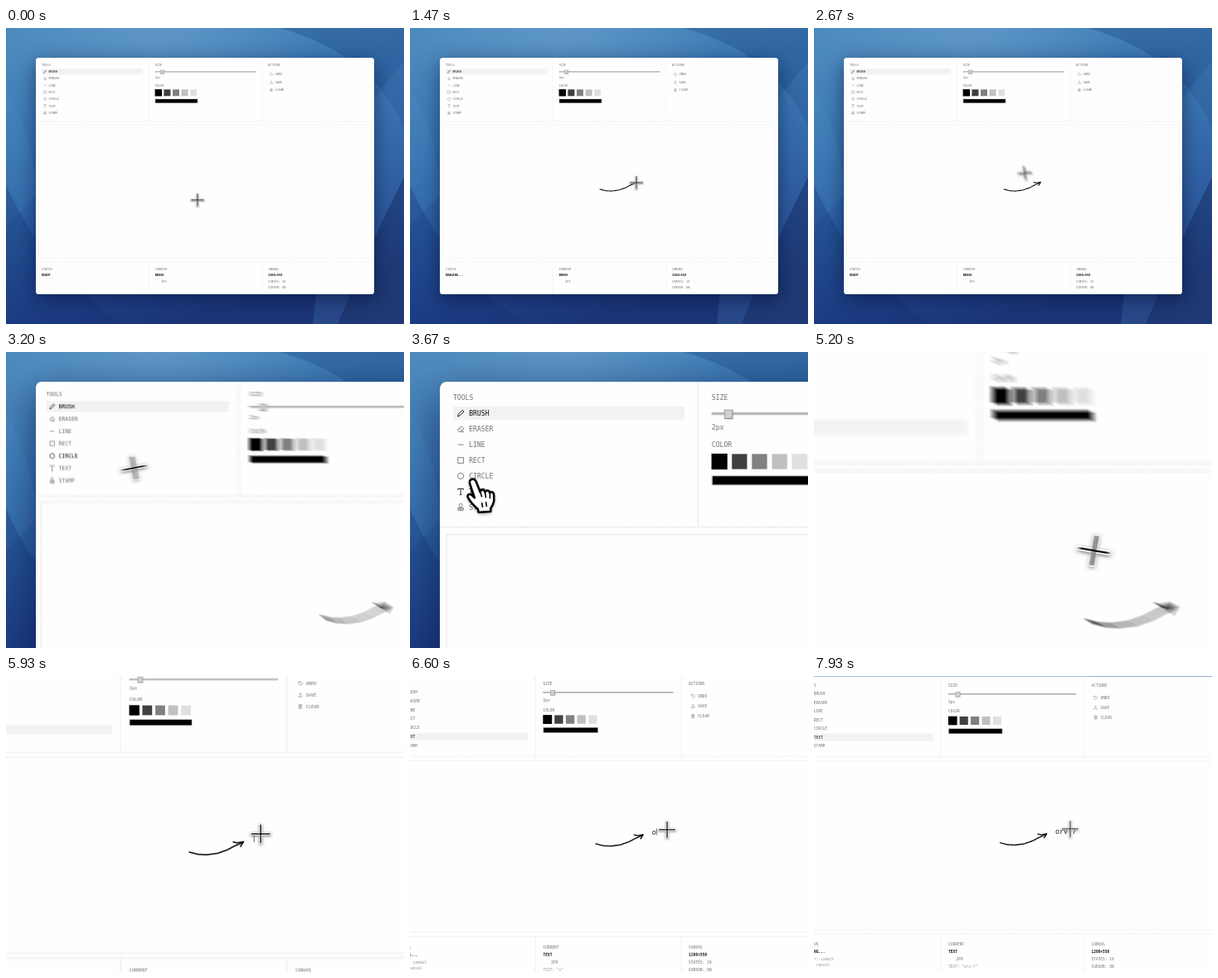
These frames come from a looping animation (480 by 358 pixels, 8 s). An HTML page with a canvas:

```html
<!DOCTYPE html>
<html lang="en">
<head>
<meta charset="utf-8">
<title>Drawing app demo</title>
<style>
html, body { margin: 0; width: 100%; height: 100%; overflow: hidden; background: #24539a; }
canvas { display: block; width: 480px; height: 358px; }
</style>
</head>
<body>
<canvas id="stage"></canvas>
<script>
const W = 480, H = 358, LOOP = 8000, SHUTTER = 20, SAMPLES = 11;
const WIN = { x: 36, y: 36, w: 408, h: 286 };
const FONT = '"DejaVu Sans Mono", "Liberation Mono", monospace';
const GRAY = '#747474', INK = '#111';
const WORD = 'orv-7';
const KEYS_AT = [6400, 6700, 6970, 7230, 7530];
const dpr = window.devicePixelRatio || 1;

function layer(el = document.createElement('canvas')) {
  el.width = Math.round(W * dpr);
  el.height = Math.round(H * dpr);
  return el.getContext('2d');
}
const stage = layer(document.getElementById('stage'));
const buffer = layer();
const wall = layer();

const clamp = (v, a = 0, b = 1) => Math.min(b, Math.max(a, v));
const mix = (a, b, p) => a + (b - a) * p;
const smooth = u => u * u * (3 - 2 * u);

// Critically damped spring, 0 to 1
function spring(t, start, speed) {
  const x = Math.max(0, t - start) / 1000 * speed;
  return 1 - (1 + x) * Math.exp(-x);
}

// Scale and offset: whole window, its corner, the arrow, a wider view
const VIEWS = [
  { s: 1, x: 0, y: 0 },
  { s: 2.345, x: -48.4, y: -48.4 },
  { s: 2.345, x: -334, y: -198 },
  { s: 1.265, x: -65.2, y: -45 }
];
const MOVES = [[2870, 6], [4895, 6], [5165, 4]];

function camera(t) {
  const view = { ...VIEWS[0] };
  MOVES.forEach(([start, speed], i) => {
    const p = spring(t, start, speed);
    for (const k in view) view[k] = mix(view[k], VIEWS[i + 1][k], p);
  });
  return view;
}

// Hand drawn arrow
const SHAFT = [[229, 195], [236, 196.8], [243, 197.2], [252, 196], [260, 193.2], [266, 190], [273, 187]];
const HEAD = [[265, 186.6], [268, 187.4], [273.4, 186.4], [271, 190.3]];

function along(pts, p) {
  const f = clamp(p) * (pts.length - 1), i = Math.min(pts.length - 2, Math.floor(f));
  return [mix(pts[i][0], pts[i + 1][0], f - i), mix(pts[i][1], pts[i + 1][1], f - i)];
}
const shaftPart = t => smooth(clamp((t - 600) / 850));
const headPart = t => clamp((t - 1980) / 480);

// time, x, y, bend of the way there
const PATH = [
  [0, 231, 208], [480, 229, 195], [1470, 273, 187], [1680, 273, 187], [1940, 265, 186.6],
  [2460, 271, 190.3], [2500, 271, 190.3], [3510, 53.5, 89, 2], [4600, 53.5, 89],
  [5480, 287.5, 180], [6100, 287.5, 180], [6500, 295.8, 181.8], [8100, 295.8, 181.8]
];

function pointer(t) {
  if (t >= 480 && t < 1470) return along(SHAFT, shaftPart(t));
  if (t >= 1940 && t < 2460) return along(HEAD, headPart(t));
  const i = PATH.findIndex(k => k[0] > t), a = PATH[Math.max(0, i - 1)], b = PATH[i];
  const p = smooth(clamp((t - a[0]) / (b[0] - a[0] || 1)));
  return [mix(a[1], b[1], p), mix(a[2], b[2], 1 - (1 - p) ** (b[3] || 1))];
}

function paintWall(c) {
  c.scale(dpr, dpr);
  let g = c.createLinearGradient(120, 0, 200, H);
  [[0, '#4c89bd'], [.3, '#3a77b3'], [.6, '#295c9f'], [.85, '#20448c'], [1, '#1b3478']]
    .forEach(([p, col]) => g.addColorStop(p, col));
  c.fillStyle = g;
  c.fillRect(0, 0, W, H);
  g = c.createRadialGradient(190, -10, 0, 190, -10, 190);
  g.addColorStop(0, 'rgba(125,175,215,.42)');
  g.addColorStop(1, 'rgba(125,175,215,0)');
  c.fillStyle = g;
  c.fillRect(0, 0, W, H);
  const sweep = (d, col) => { c.fillStyle = col; c.fill(new Path2D(d)); };
  sweep('M330 0Q440 30 480 120V0Z', 'rgba(20,60,120,.28)');
  sweep('M480 42Q390 130 370 358H480Z', 'rgba(90,150,205,.2)');
  sweep('M480 180Q440 260 400 358H480Z', 'rgba(18,38,92,.45)');
  sweep('M0 75Q30 120 38 200L0 240Z', 'rgba(90,150,205,.16)');
  sweep('M0 190Q50 300 140 358H0Z', 'rgba(20,48,112,.3)');
}

function text(c, str, x, y, color = GRAY, bold = false, size = 3.55) {
  const k = 20;
  c.save();
  c.translate(x, y + size * .365);
  c.scale(1 / k, 1 / k);
  c.font = `${bold ? 'bold ' : ''}${size * k}px ${FONT}`;
  c.fillStyle = color;
  c.fillText(str, 0, 0);
  c.restore();
}

const ICONS = {
  BRUSH: 'M-1.6 1.7L-1.2 .4L.9 -1.7L1.7 -.9L-.4 1.2Z',
  ERASER: 'M-1.7 .4L.3 -1.5L1.7 -.1L.1 1.5H-.7ZM-.8 -.5L.7 1M.1 1.5H1.7',
  LINE: 'M-1.5 0H1.5',
  RECT: 'M-1.5 -1.5H1.5V1.5H-1.5Z',
  CIRCLE: 'M1.6 0A1.6 1.6 0 1 1 -1.6 0A1.6 1.6 0 1 1 1.6 0Z',
  TEXT: 'M-1.5 -1V-1.6H1.5V-1M0 -1.6V1.6M-.6 1.6H.6',
  STAMP: 'M-1.5 1.6H1.5M-1.5 .9V.3H1.5V.9ZM-.4 .3V-.5A.8 .8 0 1 1 .4 -.5V.3',
  UNDO: 'M-1.5 -1.4V-.4H-.5M-1.4 -.4A1.5 1.5 0 1 1 -1 1.1',
  SAVE: 'M-1.5 .6V1.5H1.5V.6M0 -1.6V.7M-.8 -.8L0 -1.6L.8 -.8',
  CLEAR: 'M-1.5 -1.1H1.5M-.5 -1.1V-1.7H.5V-1.1M-1.1 -1.1V1.6H1.1V-1.1M-.3 -.3V.9M.3 -.3V.9'
};
for (const k in ICONS) ICONS[k] = new Path2D(ICONS[k]);

function item(c, name, iconX, textX, y, color) {
  c.save();
  c.translate(iconX, y);
  c.strokeStyle = color;
  c.lineWidth = .38;
  c.stroke(ICONS[name]);
  c.restore();
  text(c, name, textX, y, color);
}

function lines(c) {
  c.save();
  c.strokeStyle = '#d6d6d6';
  c.lineWidth = .36;
  c.setLineDash([1, .7]);
  c.beginPath();
  for (const x of [172.5, 309]) {
    c.moveTo(x, 36); c.lineTo(x, 113);
    c.moveTo(x, 282); c.lineTo(x, 322);
  }
  for (const y of [113, 282]) { c.moveTo(36, y); c.lineTo(444, y); }
  c.rect(39.5, 117, 401, 161);
  c.stroke();
  c.restore();
}

function toolbar(c, t) {
  const picked = t < 4550 ? 'BRUSH' : 'TEXT';
  const hover = t > 3140 && t < 3300 ? 'CIRCLE' : t >= 3300 && t < 4750 ? 'TEXT' : '';
  text(c, 'TOOLS', 43, 44.4);
  ['BRUSH', 'ERASER', 'LINE', 'RECT', 'CIRCLE', 'TEXT', 'STAMP'].forEach((name, i) => {
    const y = 52.7 + i * 8.32, on = name === picked;
    if (on) {
      c.fillStyle = '#f2f2f3';
      c.fillRect(43.2, y - 3.5, 122, 7);
    }
    item(c, name, 47, 51.4, y, on || name === hover ? INK : GRAY);
  });

  text(c, 'SIZE', 179.7, 44.4);
  c.fillStyle = '#a4a4a4';
  c.fillRect(179.7, 52.3, 121.8, 1.3);
  c.fillStyle = '#dedede';
  c.fillRect(180, 52.9, 121.2, .4);
  c.fillStyle = '#8c8c8c';
  c.fillRect(186.4, 50.8, 4.6, 5);
  c.fillStyle = '#d0d0d0';
  c.fillRect(186.7, 51.1, 3.8, 4.2);
  text(c, '2px', 179.7, 60);
  text(c, 'COLOR', 179.7, 69.3);
  ['#000', '#404040', '#808080', '#c0c0c0', '#e0e0e0'].forEach((col, i) => {
    c.fillStyle = col;
    const grow = i ? 0 : .2;
    c.fillRect(179.8 + i * 10.6 - grow, 74.3 - grow, 8 + 2 * grow, 8 + 2 * grow);
  });
  c.fillStyle = '#c8c8c8';
  c.fillRect(179.6, 85.6, 51.8, 5.4);
  c.fillStyle = '#000';
  c.fillRect(180.2, 86.1, 50.6, 4.4);

  text(c, 'ACTIONS', 316, 44.4);
  ['UNDO', 'SAVE', 'CLEAR'].forEach((name, i) => item(c, name, 320, 324.6, 56.2 + i * 9.5, GRAY));
}

function statusBar(c, t, typed) {
  const typing = t > 5800;
  const drawing = (t > 600 && t < 1560) || (t > 1980 && t < 2480);
  text(c, 'STATUS', 43, 292);
  text(c, typing ? 'TYPING...' : drawing ? 'DRAWING...' : 'READY', 43, 299, INK, true);
  text(c, 'CURRENT', 179.7, 292);
  text(c, t < 4550 ? 'BRUSH' : 'TEXT', 179.7, 299, INK, true);
  text(c, '2PX', 187.2, 306.3);
  if (typing) {
    text(c, 'Enter: commit', 43, 306.4, '#999');
    text(c, 'Esc: cancel', 43, 311.7, '#999');
    text(c, `TEXT: "${typed}"`, 179.7, 313.5, '#999');
  }
  text(c, 'CANVAS', 316, 292);
  text(c, '1200×550', 316, 299, INK, true);
  text(c, 'STATES: ' + (t < 600 ? 18 : 19), 316, 306.3);
  text(c, 'CURSOR: ON', 316, 313.3);
}

function inkLine(c, pts, part) {
  if (part <= 0) return;
  c.beginPath();
  c.moveTo(...pts[0]);
  for (let i = 1; i <= 36; i++) c.lineTo(...along(pts, part * i / 36));
  c.stroke();
}

function drawing(c, t, typed) {
  c.strokeStyle = INK;
  c.lineWidth = 1.1;
  c.lineCap = c.lineJoin = 'round';
  inkLine(c, SHAFT, shaftPart(t));
  inkLine(c, HEAD, headPart(t));
  c.lineCap = 'butt';
  if (t < 5700) return;
  text(c, typed, 281.6, 184, '#222', false, 6.6);
  if (Math.floor((t - 5700) / 420) % 2 === 0) {
    c.fillStyle = '#555';
    c.fillRect(281.8 + typed.length * 3.97, 180.8, .6, 6);
  }
}

const CROSS = new Path2D('M-7.2 0H7.2M0 -7.2V7.2');
const HAND = new Path2D('M-4 2C-5 -4 2 -5 4 0L9 13C9 9 14 9 15 13C16 10 20 10 21 14C22 12 26 12 26 17V24Q25 29 22 33V37L7 38L6 34Q-2 27 -6 20C-8 16 -4 14 -1 17L2 20Z');
const CREASES = new Path2D('M9 12L11 19M15 13L16 20M21 14V21M11 26L12 32M16 25L17 31');

function drawPointer(c, t, st, s) {
  const [x, y] = pointer(st);
  const speed = (pointer(Math.min(st + 8, LOOP))[0] - pointer(Math.max(st - 8, 0))[0]) / .016;
  c.save();
  c.translate(x, y);
  c.globalAlpha = 1 - .3 * clamp((t - 7690) / 240);
  c.shadowColor = 'rgba(0,0,0,.55)';
  c.shadowBlur = 2 * s * dpr;
  c.shadowOffsetY = .6 * s * dpr;
  if (t > 3300 && t < 4750) {
    c.scale(1 / 2.345, 1 / 2.345);
    c.lineJoin = 'round';
    c.lineWidth = 2.6;
    c.strokeStyle = '#000';
    c.fillStyle = '#fff';
    c.fill(HAND);
    c.shadowColor = 'transparent';
    c.stroke(HAND);
    c.lineWidth = 1.6;
    c.stroke(CREASES);
  } else {
    if (t > 2480 && t < 5500) c.rotate(clamp(speed * .0007, -.22, .17));
    c.lineCap = 'square';
    c.strokeStyle = '#fff';
    c.lineWidth = 2.5;
    c.stroke(CROSS);
    c.shadowColor = 'transparent';
    c.strokeStyle = '#111';
    c.lineWidth = 1;
    c.stroke(CROSS);
  }
  c.restore();
}

function scene(c, t, st) {
  const { s, x, y } = camera(st);
  const typed = WORD.slice(0, KEYS_AT.filter(k => t >= k).length);
  c.setTransform(1, 0, 0, 1, 0, 0);
  c.drawImage(wall.canvas, 0, 0);
  c.setTransform(s * dpr, 0, 0, s * dpr, x * dpr, y * dpr);
  c.save();
  c.shadowColor = 'rgba(5,15,50,.55)';
  c.shadowBlur = 22 * s * dpr;
  c.shadowOffsetY = 6 * s * dpr;
  c.fillStyle = '#fefefe';
  c.beginPath();
  c.roundRect(WIN.x, WIN.y, WIN.w, WIN.h, 3.6);
  c.fill();
  c.restore();
  lines(c);
  toolbar(c, t);
  statusBar(c, t, typed);
  drawing(c, t, typed);
  drawPointer(c, t, st, s);
}

function moving(t) {
  const a = camera(t - SHUTTER / 2), b = camera(t + SHUTTER / 2);
  const p = pointer(Math.max(0, t - SHUTTER / 2)), q = pointer(Math.min(LOOP, t + SHUTTER / 2));
  return Math.hypot(b.x - a.x, b.y - a.y) + 480 * Math.abs(b.s - a.s) +
    Math.hypot(q[0] - p[0], q[1] - p[1]) > 1.2;
}

// Averages several moments within the shutter time for motion blur
function render(t) {
  const n = moving(t) ? SAMPLES : 1;
  for (let i = 0; i < n; i++) {
    const shift = n > 1 ? (i / (n - 1) - .5) * SHUTTER : 0;
    scene(buffer, t, clamp(t + shift, 0, LOOP));
    stage.globalAlpha = 1 / (i + 1);
    stage.drawImage(buffer.canvas, 0, 0);
  }
}

paintWall(wall);
const began = performance.now();
function tick() {
  render((performance.now() - began) % LOOP);
  requestAnimationFrame(tick);
}
tick();
</script>
</body>
</html>
```
